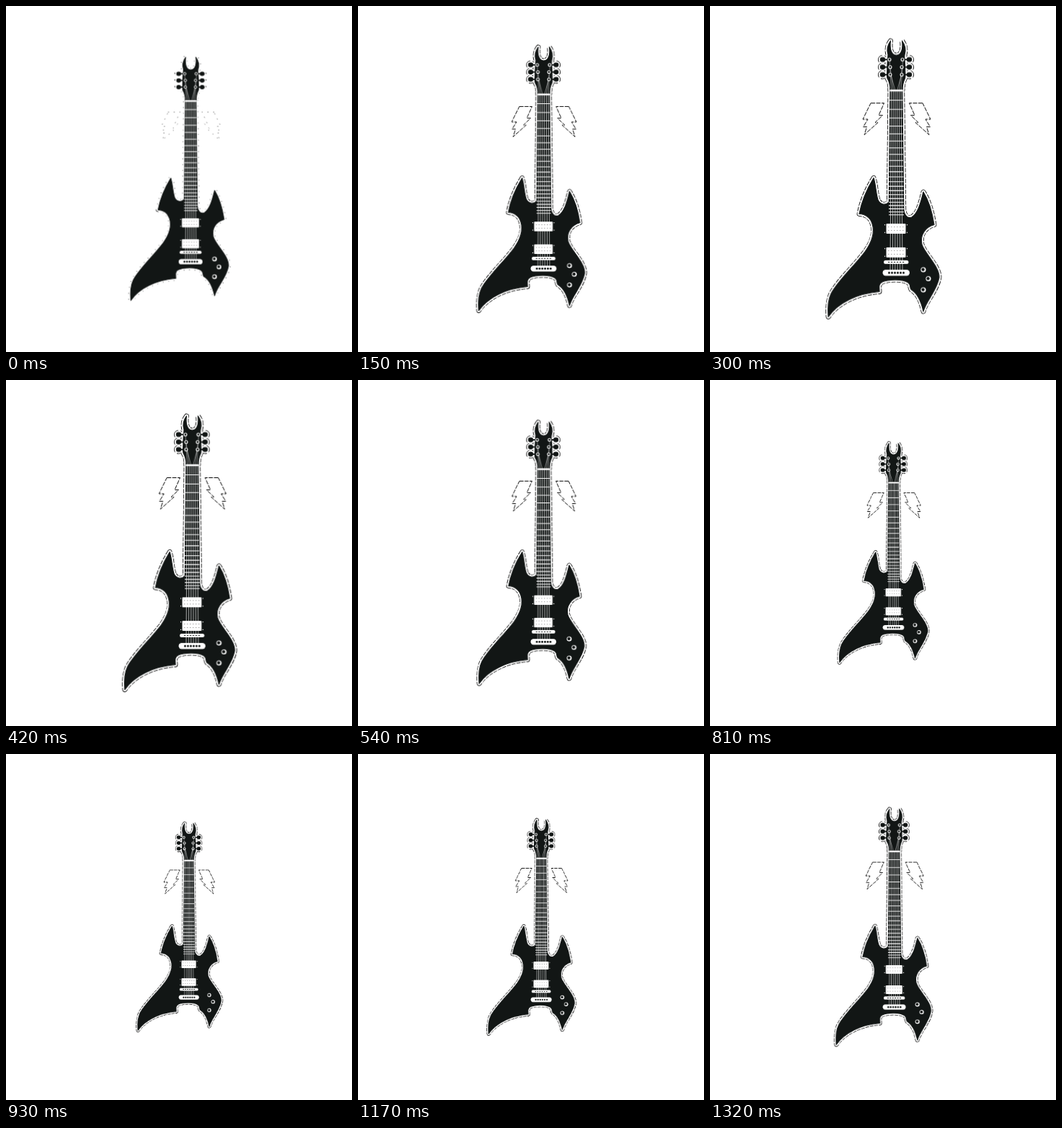
Write an HTML page without scripts that moves like this. It is 480 by 480 pixels and loops after 1350 ms.

```html
<!DOCTYPE html>
<html lang="en">
<head>
<meta charset="utf-8">
<title>Guitar</title>
<style>
  html, body { margin: 0; width: 100%; height: 100%; overflow: hidden; background: #fff; }
  svg { display: block; width: 100vw; height: 100vh; }
  .pulse {
    transform-origin: 240px 240px;
    animation: pulse 675ms cubic-bezier(.364, 0, .636, 1) -337.5ms infinite alternate;
  }
  .edge {
    stroke: #000;
    stroke-dasharray: 6 1.5;
    animation: edge 1350ms step-end infinite;
  }
  .ink { fill: #121615; }
  .light { fill: #fff; }
  .line { fill: none; stroke: #fff; }
  @keyframes pulse {
    from { transform: scale(.74); }
    to { transform: scale(1); }
  }
  /* the rim is sparse for the first 30 ms of each loop */
  @keyframes edge {
    0% { stroke-dasharray: 1 8; }
    2.222%, 100% { stroke-dasharray: 6 1.5; }
  }
</style>
</head>
<body>
<svg viewBox="0 0 480 480">
  <defs>
    <g id="pegs">
      <ellipse cx="239.5" cy="74" rx="3.2" ry="2.8"/>
      <ellipse cx="239.5" cy="84.5" rx="3.2" ry="2.8"/>
      <ellipse cx="239.5" cy="95" rx="3.2" ry="2.8"/>
      <path d="M240 73.500h8v1h-8zm0 10.500h8v1h-8zm0 10.500h8v1h-8z"/>
    </g>
    <g id="guitar" stroke-linejoin="round">
      <use href="#pegs"/>
      <use href="#pegs" transform="matrix(-1 0 0 1 516 0)"/>
      <path d="M250.500 48C246 54 245 61 247 67C247 71 246 76 246 82C246 91 245 96 246 100C249 105 250 110 250 116H267C267 110 268 105 270.500 100C271.500 96 270.500 91 270.500 82C270.500 76 269 71 270 67C272 61 271 54 266.500 48C268 58 266 68 258.500 68C251 68 249 58 250.500 48Z"/>
      <path d="M250 114H266.700L269 300H248Z"/>
      <path d="M227 238.500C220 250 211 267 207 288.500C216 289 222 293 225 302C229 315 225 327 215 341C198 363 178 381 168 399C164 407 163 420 164 431.500C177 412 204 399 235 396.500C235 391 233 386 239 383C248 379 268 379 275 384C279 387 277 391 279 393.500C288 399 293 410 296 424C300 409 315 395 318 377C319 362 298 344 294 331C291 317 299 307 311 303.500C308 284 303 269 296 258C292 275 288 288 280 293C273 296 269 289 268 279L248 272C244 277 236 276 233 269C230 259 230 248 227 238.500Z"/>
    </g>
    <path id="bolt" d="M223 134.500H241.500L234 151.500H239.500L229 161.500H233L214 178.500L217.500 167.500H212.500L219 157H212Z"/>
    <g id="pickup">
      <rect class="light" x="244.5" width="27" height="14" rx="1"/>
      <path d="M247 4.500H270M247 9.500H270" fill="none" stroke="#888" stroke-width=".8" stroke-dasharray="1.5 2.5"/>
      <path class="line" d="M242.500 1v12M273.500 1v12" stroke-width="1.2" stroke-dasharray="1.2 9.6"/>
    </g>
    <circle id="post" r="2" class="ink" stroke="#fff" stroke-width="1.1"/>
    <g id="knob">
      <circle r="3.600" class="light"/>
      <circle cx="-.4" cy="-.3" r="2.2" class="ink"/>
    </g>
  </defs>

  <rect width="480" height="480" fill="#fff"/>
  <g class="pulse">
    <g class="edge" fill="#fff" stroke-width="1">
      <use href="#bolt"/>
      <use href="#bolt" transform="matrix(-1 0 0 1 518 0)"/>
    </g>
    <use href="#guitar" class="edge" stroke-width="6.8"/>
    <use href="#guitar" stroke="#fff" stroke-width="5.2"/>
    <use href="#guitar" class="ink" stroke="#121615" stroke-width="1.2"/>

    <!-- strings, nut and frets -->
    <path class="line" stroke-width=".75" opacity=".85" d="M251.500 117L250 366M254.200 117L253.400 366M256.900 117L256.800 366M259.600 117L260.200 366M262.300 117L263.600 366M265 117L267 366"/>
    <path class="line" stroke-width=".6" opacity=".7" d="M251.500 117L249 74M254.200 117L250 85M256.900 117L251 95M259.600 117L265.500 95M262.300 117L266.500 85M265 117L267.500 74"/>
    <path class="line" stroke-width="2.6" d="M249.500 117H267.500"/>
    <path class="line" stroke-width="1.1" d="M249 130.500h18.500M249 143.200h18.500M249 155.200h18.500M249 166.500h18.500M249 177.200h18.500M248.500 187.300h19.500M248.500 196.800h19.500M248.500 205.800h19.500M248.500 214.300h19.500M248.500 222.300h19.500M248.500 229.900h19.500M248 237h20.500M248 243.700h20.500M248 250.100h20.500M248 256.100h20.500M248 261.800h20.500M248 267.100h20.500M248 272.200h20.500M248 276.900h21M248 281.400h21M248 285.700h21M248 289.700h21"/>

    <use href="#post" x="249" y="74"/>
    <use href="#post" x="250" y="84.5"/>
    <use href="#post" x="250" y="95"/>
    <use href="#post" x="267" y="74"/>
    <use href="#post" x="266" y="84.5"/>
    <use href="#post" x="266" y="95"/>

    <use href="#pickup" y="302"/>
    <use href="#pickup" y="335"/>
    <rect class="light" x="241" y="353" width="34.5" height="5" rx="2.5"/>
    <path d="M247 355.500H271" fill="none" stroke="#121615" stroke-width="1.2" stroke-dasharray="2.2 1.8"/>
    <rect class="light" x="239.5" y="366" width="37.5" height="8.5" rx="4.2"/>
    <path d="M248.500 370.300H269" fill="none" stroke="#121615" stroke-width="3" stroke-linecap="round" stroke-dasharray="0 4"/>

    <use href="#knob" x="296" y="366"/>
    <use href="#knob" x="303" y="378.5"/>
    <use href="#knob" x="296" y="394"/>
  </g>
</svg>
</body>
</html>
```
